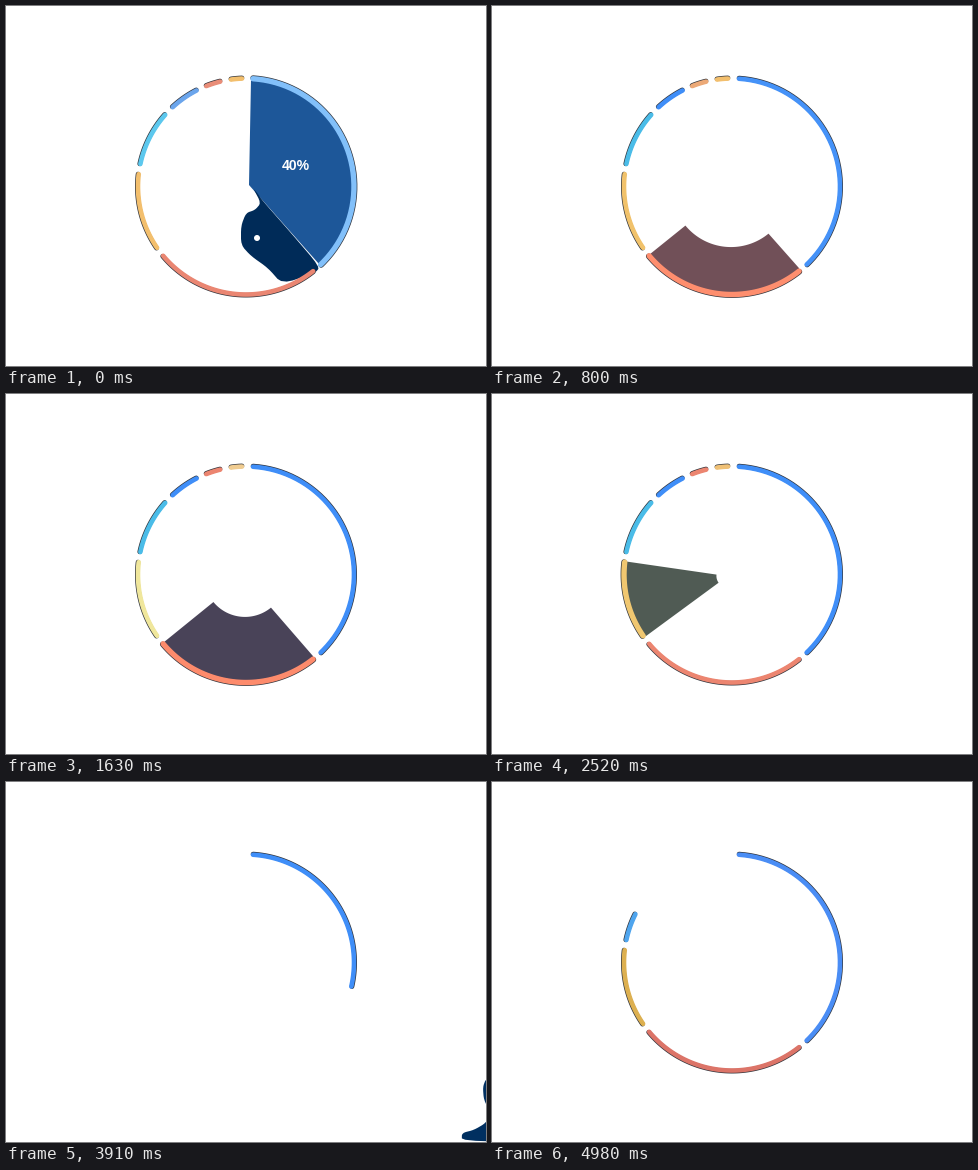
These frames come from a looping animation (480x360 px, 5.01 s). A matplotlib script:

```python
import numpy as np
import matplotlib.pyplot as plt
from matplotlib.animation import FuncAnimation
from matplotlib.colors import to_rgb

W, H, DPI = 480, 360, 100
STEP, LOOP = 30, 5010
PX = 72 / DPI
CENTER, RADIUS = np.array([240, 180.5]), 108
NAVY = "#002b58"

# start angle, end angle (clockwise from the top), colour keys (ms, colour)
SEGMENTS = [
    (3.7, 136.3, [(500, "#82c0fa"), (680, "#4a95f8"), (950, "#3f8ef8"),
                  (4530, "#3f8ef8"), (4560, "#4a8df5")]),
    (141.6, 230.1, [(500, "#ea8672"), (680, "#edb8a8"), (800, "#ff8c6b"),
                    (1600, "#ff8c6b"), (1900, "#ec8570"),
                    (4530, "#ec8570"), (4560, "#dc7468")]),
    (235.4, 276.6, [(500, "#f3bf6d"), (1450, "#edc868"), (1600, "#f0e8a0"),
                    (1900, "#efdd7e"), (2400, "#efdd7e"), (2610, "#f0bb68"),
                    (4530, "#f0bb68"), (4560, "#ddb050")]),
    (282, 311.6, [(500, "#5cc8ee"), (680, "#4abce8"),
                  (4530, "#4abce8"), (4560, "#4fa5ee")]),
    (317.2, 332.8, [(500, "#6ba5ec"), (680, "#3f8ef8")]),
    (338.4, 346.2, [(500, "#e98d78"), (680, "#ecc47c"), (950, "#ec8570")]),
    (352, 357.9, [(500, "#f3bf6d"), (1450, "#f3bf6d"), (1600, "#f0cc90"),
                  (2400, "#f0cc90"), (2610, "#f0bb68")]),
]

# segment, arrival, departure, apex, fill, fade, collapse power, label, label spot
WEDGES = [
    (0, -900, 500, (243, 179), "#1d5799", 0.2, 5.5, "40%", (290, 159)),
    (1, 740, 1450, (239, 182), "#715058", 0.45, 3.75, "27%", (236, 243)),
    (2, 1690, 2400, (236, 182), "#6a6b52", 0.45, 3.75, "14%", (176.5, 195.5)),
]

BLOB_REST = np.array([
    (247, 182), (252, 188), (256, 194), (285, 227), (314, 261), (309, 267),
    (276, 278), (262, 262), (245, 250), (235, 239), (235, 220), (240, 207),
    (249, 204), (255, 197)])
BLOB_SPILL = np.array([
    (244, 154), (260, 166), (262, 196), (301, 239), (315, 258), (309, 264),
    (282, 244), (258, 244), (267, 235), (262, 226), (246, 215), (243, 202),
    (229, 182), (233, 166)])
HOLE = np.array([(337, 216), (320, 221), (311, 234), (300, 238), (304, 251),
                 (316, 252), (328, 243), (337, 228)])
TIP = np.array([(219, 78), (244, 72), (244, 105), (238, 88)])
SPLASH = [(169, 228), (155, 243), (159, 244), (160, 250), (166, 251), (167, 239)]
FIGURE = [
    [(530, 160), (477, 160), (473, 164), (475, 185), (479, 222), (530, 222)],
    [(530, 238), (480, 238), (479, 258), (476, 271), (480, 278), (530, 278)],
    [(530, 294), (476, 294), (467, 297), (464, 305), (465, 318), (472, 331),
     (467, 341), (455, 348), (443, 351), (443, 359), (530, 360)],
]


def lerp(a, b, p):
    return np.asarray(a) + (np.asarray(b) - np.asarray(a)) * p


def steps_since(t, start):
    """Number of changes made since a motion began at `start`."""
    return int((t - start) // STEP) + 1 if t >= start else 0


def key_color(keys, t):
    times = [k[0] for k in keys]
    rgb = np.array([to_rgb(k[1]) for k in keys])
    return tuple(np.interp(t, times, rgb[:, c]) for c in range(3))


def arc(a0, a1, radius, center=CENTER):
    a = np.radians(np.linspace(a0, a1, max(3, int(a1 - a0))))
    return np.column_stack([np.sin(a), -np.cos(a)]) * radius + center


def smooth(points, rounds=2):
    """Corner cutting on a closed outline."""
    p = np.asarray(points, float)
    for _ in range(rounds):
        q = np.roll(p, -1, axis=0)
        p = np.stack([lerp(p, q, 0.2), lerp(p, q, 0.8)], axis=1).reshape(-1, 2)
    return p


fig = plt.figure(figsize=(W / DPI, H / DPI), dpi=DPI, facecolor="white")
ax = fig.add_axes([0, 0, 1, 1])


def fill(points, color):
    ax.add_patch(plt.Polygon(points, facecolor=color, edgecolor="none"))


def stroke(points, color, width):
    ax.plot(*points.T, color=color, lw=width * PX, solid_capstyle="round")


def draw_wedge(t, seg, arrive, leave, apex, color, fade, power, label, spot):
    if t < arrive:
        return
    out = steps_since(t, leave)
    if out >= 9:
        return
    grow = min(steps_since(t, arrive) / 8, 1)
    inner = 105 * max((1 - grow) ** 2, (out / 9) ** power)
    a0, a1, _ = SEGMENTS[seg]
    a0, a1 = a0 - 1, a1 + 0.4
    shade = lerp(to_rgb(color), to_rgb(NAVY), fade * out / 9)
    fill(np.vstack([arc(a0, a1, 106), arc(a0, a1, inner, apex)[::-1]]), shade)
    opacity = min(max(grow * 3 - 2, 0), max(1 - out / 3, 0))
    if opacity > 0:
        ax.text(*spot, label, color="white", alpha=opacity, ha="center",
                va="center_baseline", family="Liberation Sans",
                weight="bold", size=14 * PX)


def draw_spill(t):
    k = steps_since(t, 500)
    if k < 10:
        blob = lerp(BLOB_REST, BLOB_SPILL, min(k / 7, 1))
        blob = lerp(blob, (311, 262), max(k - 7, 0) / 3)
        fill(smooth(blob), NAVY)
        if k < 3:
            ax.add_patch(plt.Circle((251, 232), 3 - k, color="white", lw=0))
    if 4 <= k < 9:
        size = (k - 3) / 4
        fill(smooth(lerp((337, 228), HOLE, size)), "white")
        fill(lerp((244, 72), TIP, min(size, 1)), NAVY)


def draw_ring(t):
    if t >= 4530:
        sweep = 296.6 * steps_since(t, 4530) / 16
    elif t >= 3610:
        sweep = 360 * max(1 - (steps_since(t, 3610) - 1) / 14, 0)
    else:
        sweep = 360
    active = {w[0] for w in WEDGES if w[1] <= t < w[2] + 8 * STEP}
    for i, (a0, a1, keys) in enumerate(SEGMENTS):
        if sweep <= a0:
            break
        end = min(a1, sweep)
        width = 5.4 if i in active else 4.6
        stroke(arc(a0, end, RADIUS + 0.7), "#30343c", width)
        stroke(arc(a0, end, RADIUS), key_color(keys, t), width)


def draw_figure(t):
    if t < 3610:
        return
    if t < 4530:
        shift = 45 * max(1 - (steps_since(t, 3610) - 1) / 14, 0)
    else:
        shift = 45 * steps_since(t, 4530) / 8
    if shift < 45:
        for part in FIGURE:
            fill(smooth(np.array(part) + (shift, 0)), "#002f60")


def draw(frame):
    t = frame * STEP + STEP / 2
    ax.clear()
    ax.set(xlim=(0, W), ylim=(H, 0))
    ax.axis("off")
    for wedge in WEDGES:
        draw_wedge(t, *wedge)
    draw_spill(t)
    if 1840 <= t < 2490:
        fill(SPLASH, NAVY)
    draw_ring(t)
    draw_figure(t)
    return []


anim = FuncAnimation(fig, draw, frames=LOOP // STEP, interval=STEP,
                     init_func=lambda: [], repeat=True, repeat_delay=0)
plt.show()
```
